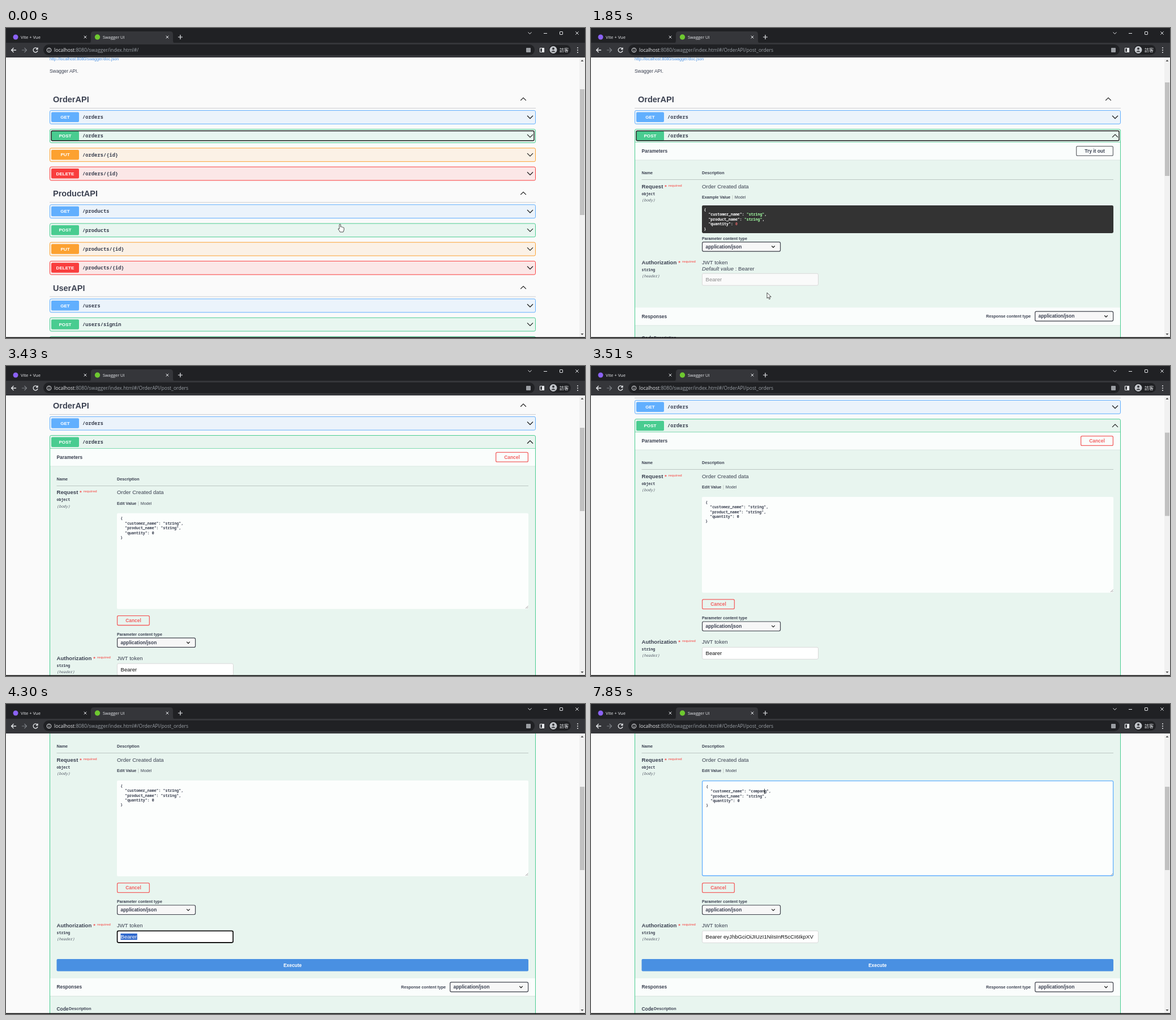
Write an HTML page that moves like this. It is 1023 px wide and 547 px high and loops after 8 s.

```html
<!DOCTYPE html>
<html lang="en">
<head>
<meta charset="utf-8">
<title>Swagger UI</title>
<style>
html, body { margin: 0; width: 100%; height: 100%; overflow: hidden; background: #fafafa; }
svg { display: block; }
text { white-space: pre; font-family: "Liberation Sans", Arial, sans-serif; fill: #3b4151; }
.b { font-weight: 700; }
.i { font-style: italic; }
.m { font-family: "Noto Sans Mono", monospace; font-weight: 700; }
.s { font-weight: 600; }
.n { font-weight: 400; }
.u { font-family: "Open Sans", "Noto Sans", sans-serif; }
.c { font-family: "Noto Sans CJK TC", "Noto Sans CJK JP", sans-serif; }
.mid { text-anchor: middle; }
</style>
</head>
<body>
<svg id="stage" width="1023" height="547" viewBox="0 0 1023 547"></svg>
<script>
const LOOP = 8000;
const BLUE = '#61affe', GREEN = '#49cc90', ORANGE = '#fca130', RED = '#f93e3e', INK = '#3b4151';
const CHAR = 3.96;

// [start, end, number of pictures]: time is held between the pictures
const STEPS = [[100, 900, 11], [970, 1770, 11], [1850, 2630, 11], [2710, 3110, 6], [3350, 3970, 9]];
const POINTER = [[20, 590, 346], [900, 330, 187], [1130, 330, 187], [1770, 308, 461], [1850, 311, 467],
  [2630, 892, 248], [2790, 888, 215], [3110, 888, 215]];
const SCROLL = [[3310, 0], [3350, 24], [3427, 56], [3505, 85], [3582, 115], [3660, 142], [3737, 163],
  [3815, 174], [3892, 179], [3970, 181]];
const TYPED = [[7040, 'c'], [7290, 'o'], [7370, 'm'], [7530, 'p'], [7770, 'a'], [7850, 'n']];

function snap(t) {
  for (const [a, b, n] of STEPS) {
    if (t < a) break;
    if (t < b) {
      const d = (b - a) / (n - 1);
      return a + Math.floor((t - a) / d + 0.05) * d;
    }
  }
  return t;
}

function track(keys, t, k) {
  const j = keys.findIndex(p => p[0] > t);
  if (j < 0) return keys[keys.length - 1][k];
  if (j === 0) return keys[0][k];
  const a = keys[j - 1], b = keys[j];
  return a[k] + (b[k] - a[k]) * (t - a[0]) / (b[0] - a[0]);
}

const text = (x, y, s, size, cls = '', fill = INK) =>
  `<text x="${x}" y="${y}" font-size="${size}" class="${cls}" style="fill:${fill}">${s}</text>`;
const rect = (x, y, w, h, fill, r = 0, stroke = 'none', sw = 1) =>
  `<rect x="${x}" y="${y}" width="${w}" height="${h}" rx="${r}" fill="${fill}" stroke="${stroke}" stroke-width="${sw}"/>`;
const path = (d, stroke, w = 1, fill = 'none') =>
  `<path d="${d}" stroke="${stroke}" stroke-width="${w}" fill="${fill}" stroke-linejoin="round"/>`;
const circle = (x, y, r, fill, stroke = 'none') =>
  `<circle cx="${x}" cy="${y}" r="${r}" fill="${fill}" stroke="${stroke}"/>`;
const chevron = (x, y, w, up, color = '#222', sw = 1.3) => {
  const h = up ? -w / 2 : w / 2;
  return path(`M${x - w} ${y - h}L${x} ${y + h}L${x + w} ${y - h}`, color, sw);
};
const cross = (x, y, r) => path(`M${x - r} ${y - r}l${2 * r} ${2 * r}m0 ${-2 * r}l${-2 * r} ${2 * r}`, '#e8eaed');

function browser(url) {
  const W = '#e8eaed', G = '#9aa0a6';
  return rect(0, 0, 1023, 27, '#202124') + rect(0, 26, 1023, 26, '#35363a') +
    path('M146 27Q150 27 150 22V11Q150 6 155 6H290Q295 6 295 11V22Q295 27 299 27Z', 'none', 0, '#35363a') +
    circle(17, 16, 4.5, '#8b62f5') + circle(161.5, 16, 4.7, '#6ec830') +
    text(26, 18.8, 'Vite + Vue', 7.6, 'u', W) + text(171, 18.8, 'Swagger UI', 7.4, 'u', W) +
    cross(140, 16, 2.3) + cross(285, 16, 2.3) + path('M304 16h8m-4 -4v8', W, 1.2) +
    chevron(925.5, 9, 3, false, W, 1) + path('M950 9.5h6', W) + rect(978.5, 6.5, 5, 5, 'none', 0.6, W) + cross(1009, 9, 2.7) +
    path('M18 39H9.5m4 -4l-4 4l4 4', W, 1.3) + path('M28 39h8.5m-4 -4l4 4l-4 4', '#7c7f84', 1.2) +
    path('M55.3 36.5A4 4 0 1 0 56 40M56 34.5v3h-3', W, 1.3) +
    rect(66, 29, 868, 19, '#202124', 9.5) + circle(76, 39, 3.8, 'none', W) + path('M76 38.3v3M76 36.3v1', W) +
    text(85, 41.8, `localhost<tspan fill="${G}" style="fill:${G}">${url}</tspan>`, 8.65, 'u', W) +
    rect(919, 35, 8, 8, '#9a9da2', 1) +
    rect(943.5, 35.5, 7, 7, 'none', 0.5, W, 1.2) + rect(947, 35, 4, 8, W) +
    rect(959, 30, 39, 17, '#202124', 8.5) + circle(967, 38.5, 6.5, '#c4c7cc') +
    circle(967, 36.6, 2, '#35363a') + path('M963.2 42.3Q967 37.5 970.8 42.3Z', 'none', 0, '#35363a') +
    text(978, 41.6, '訪客', 8, 'c', W) +
    [35, 39, 43].map(y => circle(1010, y, 1, W)).join('');
}

function scrollbar(top, height) {
  return rect(1013, 52, 10, 494, '#f1f1f1') + rect(1014, top, 8, height, '#c1c1c1') +
    path('M1015.5 59l2.5 -3l2.5 3Z', 'none', 0, '#505050') + path('M1015.5 539l2.5 3l2.5 -3Z', 'none', 0, '#505050');
}

function summary(y, method, color, route, open) {
  return rect(80, y + 3.5, 49, 17.5, color, 2) + text(104.5, y + 15, method, 8.1, 'b mid', '#fff') +
    text(135, y + 15.2, route, 8.8, 'm') + chevron(926, y + 12.2, 5, open);
}

const row = (y, method, color, route) =>
  rect(77.5, y + 0.5, 858, 23.8, color, 2.4, 'none').replace('/>', ' fill-opacity=".1"/>') +
  rect(77.5, y + 0.5, 858, 23.8, 'none', 2.4, color) + summary(y, method, color, route);

const heading = (y, name) => text(83, y + 5.2, name, 14.5, 'b') + chevron(914, y - 0.5, 4.8, true) +
  rect(77, y + 15.2, 859, 0.7, '#b9bbc0');

const ring = () => rect(80, 181.5, 853, 17.3, 'none', 2, '#1c1c1c', 1.4);

function list() {
  const kinds = [['GET', BLUE], ['POST', GREEN], ['PUT', ORANGE], ['DELETE', RED]];
  const sections = [['OrderAPI', '/orders', '/orders', '/orders/{id}', '/orders/{id}'],
    ['ProductAPI', '/products', '/products', '/products/{id}', '/products/{id}'],
    ['UserAPI', '/users', '/users/signin']];
  return sections.map(([name, ...routes], k) => {
    const y = 126 + k * 166.25;
    return heading(y, name) + routes.map((r, j) => row(y + 19 + j * 33.2, ...kinds[j], r)).join('');
  }).join('') + row(543.9, 'POST', GREEN, '/users');
}

const button = (x, y, w, label, stroke, color) =>
  rect(x + 0.6, y + 0.6, w - 1.2, 16.8, 'none', 2.2, stroke, 1.3) + text(x + w / 2, y + 12.1, label, 8.4, 'b mid', color);

const select = (x, y, h = 16.5) => rect(x + 0.6, y + 1.4, 138, h, 'rgba(0,0,0,.13)', 2.4) +
  rect(x + 0.6, y + 0.6, 138, h, '#f7f7f7', 2.4, '#41444e', 1.2) +
  text(x + 6.5, y + h / 2 + 3.3, 'application/json', 8.4, 'b') + chevron(x + 126, y + h / 2 + 0.6, 2.8, false);

const band = (y, h, label) => rect(78, y + h, 857, 1, 'rgba(0,0,0,.07)') + rect(78, y, 857, h, 'rgba(255,255,255,.8)') +
  text(89.5, y + 18.4, label, 8.4, 'b');

const param = (y, name, starX, type, place) => text(89.5, y, name, 9.6, 'b') +
  text(starX, y, '*', 9.6, 'b', '#f05a5a') + text(starX + 6.7, y - 3, 'required', 6, 'b', '#f5706c') +
  text(89.5, y + 12, type, 6.6, 'm') + text(89.5, y + 23.2, place, 6.6, 'm i n', '#555b68');

function code(x, y, customer, keyFill, strFill, numFill, cls) {
  const str = s => `<tspan style="fill:${strFill}">"${s}"</tspan>`;
  const lines = ['{', `  "customer_name": ${str(customer)},`, `  "product_name": ${str('string')},`,
    `  "quantity": <tspan style="fill:${numFill}">0</tspan>`, '}'];
  return lines.map((l, k) => text(x, y + k * 8.45, l, 6.6, cls, keyFill)).join('');
}

function example() {
  return text(196, 301.2, 'Example Value', 7.2, 'b') + rect(249.7, 295, 0.7, 8, '#b5bbb9') + text(253.8, 301.2, 'Model', 7.2) +
    rect(196, 313, 727, 49, '#333', 2.4) + code(199.5, 323, 'string', '#fff', '#a2fca2', '#d36363', 'm');
}

function editor(t) {
  const focus = t >= 5660, d = focus ? 1 : 0, x = 202.3 + d, y = 327.6 + d;
  const typed = TYPED.filter(k => t >= k[0]).map(k => k[1]).join('');
  const customer = typed ? typed + 'g' : 'string';
  const col = n => x + n * CHAR;
  let out = text(196, 301.2, 'Edit Value', 7.2, 'b') + rect(233.6, 295, 0.7, 8, '#b5bbb9') + text(237.8, 301.2, 'Model', 7.2) +
    rect(196, 316, 727, 169, '#fcfefd', 2) + path('M918 484l4.5 -4.5m-2 4.5l2 -2', '#777', 0.7);
  if (focus) out += rect(196.6, 316.6, 726, 167.4, 'none', 2, BLUE, 1.3);
  out += code(x, y, customer, INK, INK, INK, 'm s');
  if (typed) out += rect(col(20 + typed.length), y + 2, 0.8, 9, '#000');
  else if (t >= 5735) {
    const from = t < 5810 ? 22 : t >= 6060 && t < 6130 ? 18 : 20;
    const line = '  "customer_name": "string",';
    out += rect(col(from), y + 2.4, (25 - from) * CHAR, 8.4, '#2f68cc') +
      text(col(from), y + 8.45, line.slice(from, 25), 6.6, 'm s', '#fff');
  } else if (focus) out += rect(col(25), y + 2, 0.8, 9, '#000');
  return out + button(196, 496.3, 58, 'Cancel', '#f26161', '#f26161');
}

function field(y, t, edit) {
  if (!edit) return rect(196.5, y + 0.5, 205, 21, '#fafafa', 2.4, '#d9d9d9') + text(202.5, y + 14.2, 'Bearer', 9.6, '', '#8a8a8a');
  const focus = t >= 3970 && t < 5660, pasted = t >= 4690;
  let out = focus ? rect(196.6, y + 0.3, 204.6, 20.7, '#fff', 2.4, '#151515', 1.8)
    : rect(196.5, y + 0.3, 205, 21, '#fff', 2.4, '#d9d9d9');
  const selected = t >= 4300 && !pasted;
  if (selected) out += rect(202.5, y + 5, 29.3, 11.2, '#2f68cc');
  out += text(202.5, y + 13.8, pasted ? 'Bearer eyJhbGciOiJIUzI1NiIsInR5cCI6IkpXV' : 'Bearer', 9.6, '', selected ? '#fff' : '#111');
  if (pasted && t < 5250) out += rect(394, y + 5, 0.9, 11, '#000');
  return out;
}

function openBlock(t, edit) {
  const low = edit ? 158.4 : 0, resp = edit ? 665 : 493.3;
  return rect(77.5, 178.7, 858, 900, '#e8f5ef', 2.4, GREEN) + summary(178.2, 'POST', GREEN, '/orders', true) +
    rect(78, 201.4, 857, 0.8, GREEN) + (edit ? '' : ring()) +
    band(202, 30.5, 'Parameters') +
    (edit ? button(865, 208, 58, 'Cancel', '#f26161', '#f26161') : button(857, 208, 66, 'Try it out', '#6f7176', INK)) +
    text(89.5, 258.4, 'Name', 7.2, 'b') + text(196, 258.4, 'Description', 7.2, 'b') +
    rect(89.5, 267.2, 833.5, 0.7, '#a9b3b1') +
    param(282.5, 'Request', 130, 'object', '(body)') + text(196, 282.5, 'Order Created data', 9.6) +
    (edit ? editor(t) : example()) +
    text(196, 373.7 + low, 'Parameter content type', 7.2, 'b') + select(196, 377 + low) +
    param(416.5 + low, 'Authorization', 154.3, 'string', '(header)') + text(196, 416.5 + low, 'JWT token', 9.6) +
    (edit ? rect(89.5, 631, 833.5, 21.5, '#4990e2', 2) + text(506.3, 645, 'Execute', 8.4, 'b mid', '#fff')
      : text(196, 427.6, '<tspan class="i">Default value</tspan> : Bearer', 9.6)) +
    field(edit ? 581 : 432.7, t, edit) +
    band(resp, 31, 'Responses') + text(698, resp + 18, 'Response content type', 7.2, 'b') + select(784, resp + 6.2, 17) +
    text(89.5, resp + 56.7, 'Code', 8.4, 'b') + text(111, resp + 56, 'Description', 7.2, 'b');
}

function pointer(t) {
  if (t >= 4930 && t < 5000) return path('M297 294h4m-2 0v10m-2 0h4', '#333', 0.9);
  if (t >= 3110) return '';
  const at = `<g transform="translate(${track(POINTER, t, 1)} ${track(POINTER, t, 2)})">`;
  const hand = t < 1250 || t >= 2710;
  return at + (hand
    ? path('M-1 0.8Q0.3 -0.8 1.3 0.8V5Q3 4.2 3.6 5.4Q5 4.8 5.6 6Q7 5.6 7.2 7.2V10Q6.8 12 5.8 14H0.2Q-1 11.5 -3 9Q-3.4 7.4 -1 8.4Z', '#222', 0.8, '#fff')
    : path('M0 0V10L2.3 8L3.9 11.6L5.6 10.8L4 7.4H7.2Z', '#222', 0.8, '#fff')) + '</g>';
}

function scene(t) {
  const open = t >= 1050, edit = t >= 2870;
  const shift = track(SCROLL, t, 1);
  const page = text(77, 56.8, 'http://localhost:8080/swagger/doc.json', 7.2, '', '#4990e2') +
    text(77, 79.2, 'Swagger API.', 8.4) +
    (open ? heading(126, 'OrderAPI') + row(145, 'GET', BLUE, '/orders') + openBlock(t, edit) : list() + ring());
  const bar = edit ? scrollbar(92.3 + shift * 0.297, 147) : open ? scrollbar(96, 165) : scrollbar(108, 222);
  return rect(0, 0, 1023, 547, '#fafafa') + `<g transform="translate(0 ${-shift})">${page}</g>` + bar +
    browser(':8080/swagger/index.html#/' + (open ? 'OrderAPI/post_orders' : '')) +
    rect(0, 545.5, 1023, 1.5, '#0b0b0b') + pointer(t);
}

const stage = document.getElementById('stage');
let shown = '';
function frame(now) {
  const next = scene(snap(now % LOOP));
  if (next !== shown) stage.innerHTML = shown = next;
  requestAnimationFrame(frame);
}
frame(performance.now());
</script>
</body>
</html>
```
